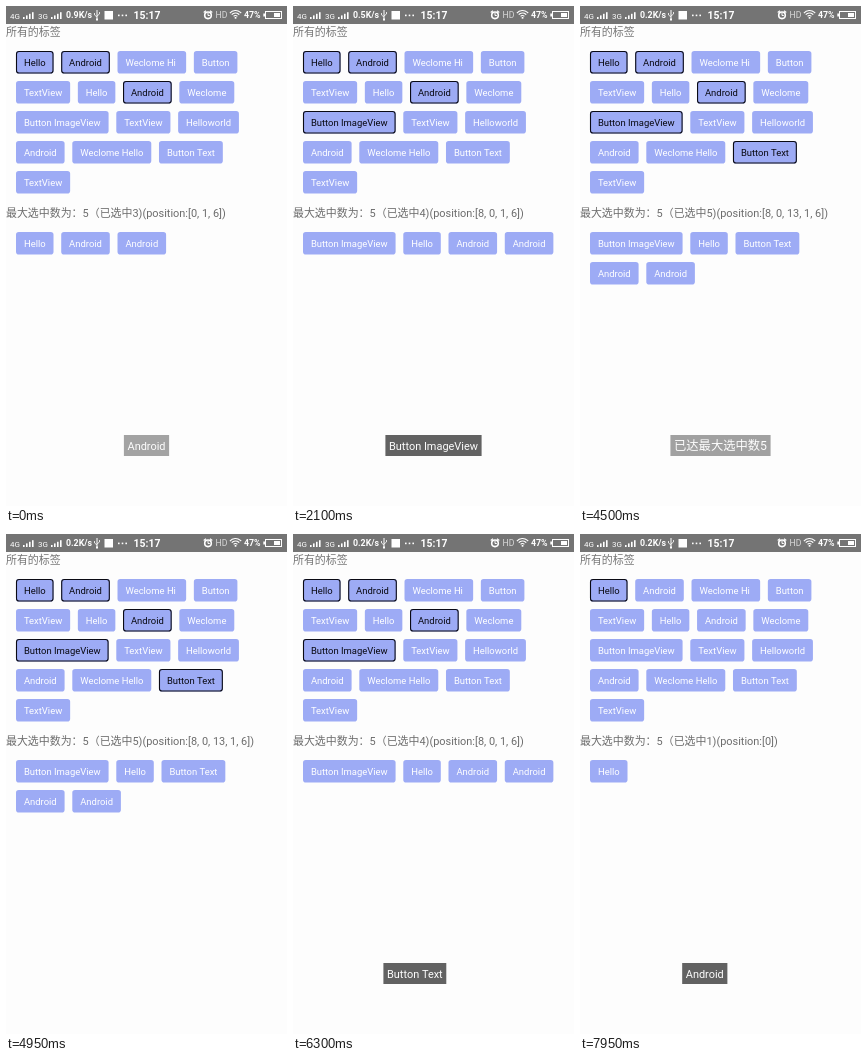
Write an HTML page with a canvas that moves like this. It is 281 by 500 pixels and loops after 8 s.

```html
<!DOCTYPE html>
<html lang="zh-CN">
<head>
<meta charset="utf-8">
<style>
html, body { margin: 0; width: 100%; height: 100%; overflow: hidden; background: #fdfdfd; }
canvas { display: block; width: 281px; height: 500px; }
</style>
</head>
<body>
<canvas id="stage"></canvas>
<script>
const W = 281, H = 500, LOOP = 8000, STEP = 150;
const FONT = 'Roboto, "Noto Sans CJK SC", "Noto Sans CJK", sans-serif';
const TAGS = ['Hello', 'Android', 'Weclome Hi ', 'Button', 'TextView', 'Hello', 'Android', 'Weclome',
  'Button ImageView', 'TextView', 'Helloworld', 'Android', 'Weclome Hello', 'Button Text', 'TextView'];
const ORDER = [8, 0, 13, 1, 6];
const FULL = '已达最大选中数5';
const SLIDE = 300, FADE = 400;

// Each tap toggles a tag (or hits the limit) and shows a toast until "hide".
const TAPS = [
  { at: -2400, tag: 6, hide: -170 },
  { at: 1600, tag: 8 },
  { at: 2150, tag: 13 },
  { at: 2400, hide: 4335 },
  { at: 5310 },
  { at: 6300, tag: 13 },
  { at: 6750, tag: 6 },
  { at: 7400, tag: 8 },
  { at: 7835, tag: 1 }
];

const canvas = document.getElementById('stage');
const ctx = canvas.getContext('2d');
const ratio = window.devicePixelRatio || 1;
canvas.width = W * ratio;
canvas.height = H * ratio;

const clamp = v => Math.max(0, Math.min(1, v));

function setFont(size, weight = 400) {
  ctx.font = `${weight} ${size}px ${FONT}`;
}

function text(str, x, y, size, color, weight) {
  setFont(size, weight);
  ctx.fillStyle = color;
  ctx.fillText(str, x, y);
}

function box(x, y, w, h, color) {
  ctx.fillStyle = color;
  ctx.fillRect(x, y, w, h);
}

function line(points, width = 1) {
  ctx.beginPath();
  points.forEach(([x, y]) => ctx.lineTo(x, y));
  ctx.lineWidth = width;
  ctx.stroke();
}

function arc(x, y, r, width, from = 0, to = Math.PI * 2) {
  ctx.beginPath();
  ctx.arc(x, y, r, from, to);
  ctx.lineWidth = width;
  ctx.stroke();
}

function signal(x) {
  for (let i = 0; i < 4; i++) box(x + i * 3, 11 - i * 1.6, 1.6, 2 + i * 1.6, '#fff');
}

function statusBar(speed) {
  box(0, 0, W, 18, '#747474');
  ctx.strokeStyle = '#fff';
  text('4G', 4, 13, 8, '#fff');
  signal(17);
  text('3G', 32, 13, 8, '#fff');
  signal(45);
  text(speed + 'K/s', 60, 12.3, 8.8, '#fff', 700);

  // USB
  line([[91, 4], [91, 13.5]]);
  line([[88.5, 7], [88.5, 9], [91, 11]], 0.8);
  line([[93.5, 6], [93.5, 8], [91, 10]], 0.8);
  box(90, 12.5, 2, 2, '#fff');

  box(98.5, 5, 8.5, 8.5, '#fff');
  for (let i = 0; i < 3; i++) box(112 + i * 3.7, 8.6, 1.6, 1.6, '#fff');
  text('15:17', 127.6, 12.9, 10.4, '#fff', 700);

  // alarm clock
  arc(202, 9.3, 3.3, 1.6);
  line([[202, 7], [202, 9.5], [203.8, 9.5]]);
  line([[197.7, 6.5], [200, 4.7]], 1.3);
  line([[204, 4.7], [206.3, 6.5]], 1.3);

  text('HD', 209.5, 12.4, 8.7, '#d8d8d8');
  [2.5, 5, 7.5].forEach(r => arc(229.5, 12, r, 1.2, -Math.PI * 0.77, -Math.PI * 0.23));
  box(228.7, 11, 1.7, 1.7, '#fff');
  text('47%', 238, 12.3, 8.8, '#fff', 700);

  // battery
  ctx.lineWidth = 1;
  ctx.strokeRect(259.5, 5.5, 16, 7);
  box(257.3, 7.5, 1.7, 3, '#fff');
  box(268, 7, 6, 4, '#fff');
}

function flow(ids, top, isOn) {
  let x = 10, y = top;
  for (const id of ids) {
    setFont(9.45);
    const w = ctx.measureText(TAGS[id]).width + 15.8;
    if (x + w > 271) {
      x = 10;
      y += 30;
    }
    const on = isOn(id);
    ctx.beginPath();
    ctx.roundRect(x, y, w, 22.5, 2.8);
    ctx.fillStyle = '#9dabf5';
    ctx.fill();
    if (on) {
      ctx.beginPath();
      ctx.roundRect(x + 0.5, y + 0.5, w - 1, 21.5, 2.6);
      ctx.strokeStyle = '#0a0a14';
      ctx.lineWidth = 1.1;
      ctx.stroke();
    }
    text(TAGS[id], x + 7.9, y + 14.8, 9.45, on ? '#080810' : '#fff');
    x += w + 7.7;
  }
}

function toastShape(tap) {
  const label = tap.tag === undefined ? FULL : TAGS[tap.tag];
  const size = label === FULL ? 12.3 : 10.95;
  setFont(size);
  const w = ctx.measureText(label).width + 7.2;
  return { label, size, w, x: (W - w) / 2 };
}

function toast(t, past) {
  const tap = past[past.length - 1], prev = past[past.length - 2];
  const shape = toastShape(tap);
  let { x } = shape, alpha = 1;
  if (prev && prev.hide === undefined) {
    const from = toastShape(prev).x;
    x = from + (x - from) * clamp((t - tap.at) / SLIDE);
  } else {
    alpha = clamp((t - tap.at) / FADE);
  }
  if (tap.hide !== undefined) alpha *= 1 - clamp((t - tap.hide) / FADE);
  if (!alpha) return;
  // White text fading as a group over a white page stays white.
  ctx.globalAlpha = alpha;
  box(x, 429, shape.w, 21, '#626262');
  ctx.globalAlpha = 1;
  text(shape.label, x + 3.6, 444.2, shape.size, '#fdfdfd');
}

function draw(t) {
  const past = TAPS.filter(tap => tap.at <= t);
  const selected = new Set([0, 1]);
  for (const { tag } of past) {
    if (tag !== undefined && !selected.delete(tag)) selected.add(tag);
  }
  const chosen = ORDER.filter(id => selected.has(id));

  ctx.setTransform(ratio, 0, 0, ratio, 0, 0);
  box(0, 0, W, H, '#fdfdfd');
  statusBar(t < 600 ? '0.9' : t < 3600 ? '0.5' : '0.2');
  text('所有的标签', 0, 29.5, 10.95, '#757575');
  flow(TAGS.keys(), 45, id => selected.has(id));
  text(`最大选中数为：5（已选中${chosen.length})(position:[${chosen.join(', ')}])`, 0, 211, 10.95, '#6c6c6c');
  flow(chosen, 226, () => false);
  toast(t, past);
}

function tick() {
  const t = performance.now() % LOOP;
  draw(Math.floor(t / STEP) * STEP);
  requestAnimationFrame(tick);
}
tick();
</script>
</body>
</html>
```
